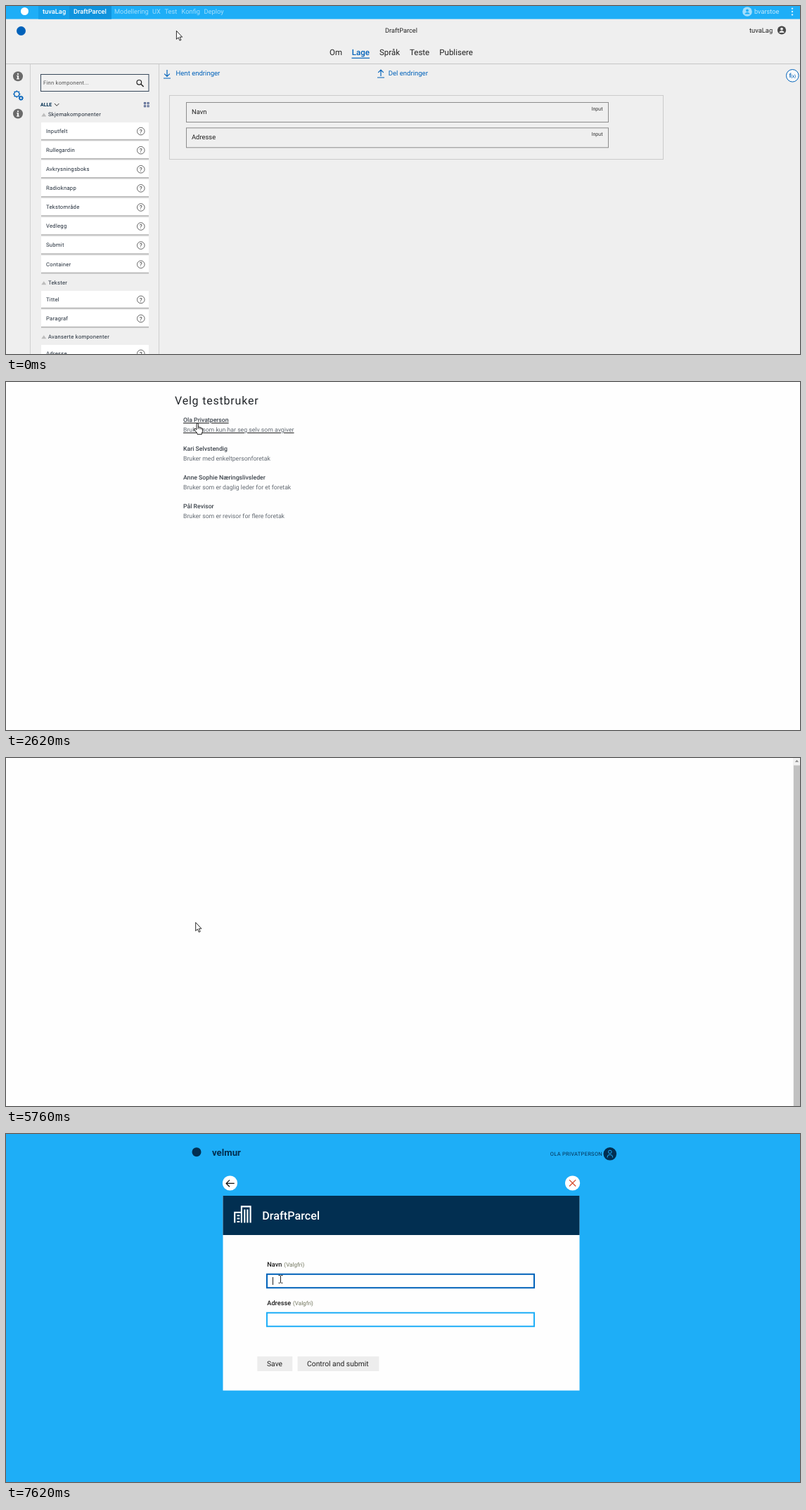
Recreate the animation shown at these times as an HTML page. Size 1129 px wide and 496 px high, loop 8000 ms.

```html
<!DOCTYPE html>
<html lang="nb">
<head>
<meta charset="utf-8">
<title>Testflyt</title>
<style>
html, body { margin: 0; width: 100%; height: 100%; overflow: hidden; background: #fefefe; }
svg { display: block; width: 100vw; height: 100vh; }
text { font-family: Roboto, Arial, sans-serif; white-space: pre; text-rendering: geometricPrecision; }
</style>
</head>
<body>
<svg id="stage" viewBox="0 0 1129 496" xmlns="http://www.w3.org/2000/svg"></svg>
<script>
const LOOP = 8000;
const SKY = '#1eaef7', NAVY = '#022f51', BLUE = '#0062ba', LINK = '#007bff', INK = '#212529';
const ORG = 'tuvaLag', APP = 'DraftParcel', USER = 'bvarstoe', BRAND = 'velmur';

const text = (x, y, s, size, fill = INK, more = '') =>
  `<text x="${x}" y="${y}" font-size="${size}" fill="${fill}" ${more}>${s}</text>`;
const rect = (x, y, w, h, fill, more = '') =>
  `<rect x="${x}" y="${y}" width="${w}" height="${h}" fill="${fill}" ${more}/>`;
const frame = (x, y, w, h, stroke, fill = 'none', sw = 1) =>
  rect(x + sw / 2, y + sw / 2, w - sw, h - sw, fill, `stroke="${stroke}" stroke-width="${sw}"`);
const disc = (x, y, r, fill, more = '') => `<circle cx="${x}" cy="${y}" r="${r}" fill="${fill}" ${more}/>`;
const line = (d, stroke, sw = 1, more = '') =>
  `<path d="${d}" fill="none" stroke="${stroke}" stroke-width="${sw}" ${more}/>`;
const shape = (d, fill, more = '') => `<path d="${d}" fill="${fill}" ${more}/>`;
const group = (id, body, more = '') => `<g id="${id}" ${more}>${body}</g>`;
const MED = 'font-weight="500"', BOLD = 'font-weight="700"', MID = 'text-anchor="middle"';

function gear(x, y, r) {
  let teeth = '';
  for (let i = 0; i < 8; i++) {
    const a = i * Math.PI / 4, c = Math.cos(a), s = Math.sin(a);
    teeth += `M${x + c * r} ${y + s * r}L${x + c * (r + 1.5)} ${y + s * (r + 1.5)}`;
  }
  return disc(x, y, r, 'none', `stroke="${BLUE}" stroke-width="1.3"`) + line(teeth, BLUE, 1.5);
}

const infoIcon = y => disc(17, y, 7, '#6a6a6a') +
  rect(15.9, y - 1.3, 2.2, 5.2, '#efefef') + rect(15, y + 2.9, 4, 1.2, '#efefef') +
  rect(15.2, y - 1.3, 2, 1.1, '#efefef') + disc(17, y - 3.4, 1.2, '#efefef');

const card = (label, y) =>
  rect(50, y - 10.5, 153, 24.3, '#c4c4c4') + rect(50, y - 11, 153, 23.8, '#a9a9a9', 'opacity=".6"') +
  rect(50, y - 12, 153, 23.8, '#fff') +
  text(57, y + 2.7, label, 7.7, '#1f2a37', 'letter-spacing=".25"') +
  disc(191.8, y + .5, 5.3, 'none', 'stroke="#555" stroke-width=".9"') +
  text(191.8, y + 3.5, '?', 8.4, '#333', MID);

const section = (label, y) => shape(`M50.3 ${y + 2.8}L53.8 ${y - 2.2}L57.3 ${y + 2.8}Z`, '#bdbdbd') +
  text(60, y + 2.7, label, 7.7, '#1f2a37', 'letter-spacing=".25"');

const person = (x, y, k, fill) => disc(x, y - 1.6 * k, 1.9 * k, fill) +
  shape(`M${x - 3.6 * k} ${y + 3.6 * k}Q${x - 3 * k} ${y + k} ${x} ${y + k}T${x + 3.6 * k} ${y + 3.6 * k}Z`, fill);

function studio() {
  const nav = [[154, 'Modellering'], [208, 'UX'], [225.5, 'Test'], [249.5, 'Konfig'], [281.5, 'Deploy']];
  const tabs = [[460, 'Om'], [491.7, 'Lage'], [531, 'Språk'], [574, 'Teste'], [616.3, 'Publisere']];
  const parts = ['Inputfelt', 'Rullegardin', 'Avkrysningsboks', 'Radioknapp', 'Tekstområde', 'Vedlegg', 'Submit', 'Container'];
  const field = (label, y) => frame(256, y, 601, 29, '#8c8c8c') +
    text(264, y + 17, label, 9.4, '#222') + text(832.5, y + 12, 'Input', 7.1, '#333');
  return rect(0, 0, 1129, 496, '#efefef') +
    rect(0, 0, 1129, 18.6, SKY) + rect(46, 0, 44, 18.6, '#139fea') + rect(90, 0, 60, 18.6, '#0f93dd') +
    disc(26.5, 7.5, 5.5, '#fff') +
    text(52, 11, ORG, 9.3, '#fff', MED) + text(96, 11, APP, 9.3, '#fff', MED) +
    nav.map(([x, s]) => text(x, 11, s, 9.3, '#a3defc')).join('') +
    disc(1054, 8, 6.8, '#a3defc') + person(1054, 8, 1, SKY) + text(1064, 11, USER, 9.2, '#c3e9fd') +
    [3.6, 8, 12.4].map(y => disc(1118, y, 1.2, '#d4f0fe')).join('') +
    disc(21.5, 35.5, 6.5, BLUE) +
    text(562, 38, APP, 9.2, '#222', MID) + text(1057, 38, ORG, 9.4, '#222') +
    disc(1103, 34.5, 6.1, '#4b4b4b') + person(1103, 34.3, 1, '#efefef') +
    tabs.map(([x, s]) => text(x, 70.3, s, 11.5, s === 'Lage' ? BLUE : '#222', s === 'Lage' ? MED : '')).join('') +
    rect(491.5, 73.6, 25.5, 1.2, BLUE) +
    rect(0, 82, 1129, 1, '#c6c6c6') + rect(34, 83, 1, 413, '#cfcfcf') + rect(217, 83, 1, 413, '#cfcfcf') +
    infoIcon(100.3) + gear(15.3, 125.5, 3.6) + gear(21.3, 131.3, 2) + infoIcon(153.5) +
    frame(49, 97, 154.5, 25, '#37485a', '#f1f1f1') +
    text(53, 111.5, 'Finn komponent...', 7.6, '#555', 'letter-spacing=".25"') +
    disc(189.3, 108.8, 3.3, 'none', 'stroke="#222" stroke-width="1.2"') + line('M191.8 111.3L195.6 115', '#222', 1.5) +
    text(49, 143, 'ALLE', 7, NAVY, BOLD) + line('M69 139L72.2 142.3 75.4 139', '#333', 1) +
    [[196, 137], [200.6, 137], [196, 141.2], [200.6, 141.2]].map(([x, y]) => frame(x, y, 3, 3, '#3b4f80', 'none', .9)).join('') +
    section('Skjemakomponenter', 154.6) + parts.map((s, i) => card(s, 178 + 27.12 * i)).join('') +
    section('Tekster', 394.4) + card('Tittel', 418) + card('Paragraf', 445) +
    section('Avanserte komponenter', 471.4) + card('Adresse', 495) +
    line('M229 91V100M225.2 96.6L229 100.4 232.8 96.6M224 103H234', BLUE, 1.2) +
    text(241.5, 99, 'Hent endringer', 9.55, BLUE) +
    line('M533 100V91M529.2 94.8L533 91 536.8 94.8M528 102H538', BLUE, 1.2) +
    text(543.7, 99, 'Del endringer', 9.55, BLUE) +
    disc(1118.3, 99.3, 8.8, '#fafafa', `stroke="${BLUE}" stroke-width="1"`) +
    text(1113.5, 102, 'f', 8.5, BLUE, MED) + text(1116, 102, '(x)', 6, BLUE, MED) +
    frame(232, 127, 703, 92, '#cbcbcb') + field('Navn', 137) + field('Adresse', 173.3) +
    group('menu', rect(222, 4, 24, 10, SKY) + text(225.5, 11, 'Test', 9.3, '#fff') +
      frame(222, 18, 85, 73, '#c8c8c8', '#fff') + rect(223, 22, 83, 20, '#e9ecef', 'id="row"') +
      ['Manuell', 'Automatisk', 'Resultat'].map((s, i) => text(230, 35 + 20 * i, s, 8.7)).join(''));
}

function users() {
  const list = [
    ['Ola Privatperson', 'Bruker som kun har seg selv som avgiver'],
    ['Kari Selvstendig', 'Bruker med enkeltpersonforetak'],
    ['Anne Sophie Næringslivsleder', 'Bruker som er daglig leder for et foretak'],
    ['Pål Revisor', 'Bruker som er revisor for flere foretak']];
  return text(240, 32, 'Velg testbruker', 16, INK, 'letter-spacing=".8"') +
    list.map(([a, b], i) => `<g id="user${i}">` + text(252, 57.2 + 40.8 * i, a, 8.7, '#3d444c', MED) +
      text(252, 71.2 + 40.8 * i, b, 8.7, '#636a72') + '</g>').join('');
}

function instance() {
  const button = (y, w, s, id = '') => rect(240, y, w, 21.7, LINK, id) + text(247.8, y + 14, s, 8.7, '#fff', MED);
  const rows = [['1883', '2/1/19 9:58:28 AM'], ['1910', '2/1/19 10:00:30 AM'], ['1110', '2/1/19 10:04:54 AM']];
  const top = i => 300.5 + 27.6 * i;
  return rect(240, 16.5, 644, 28.5, '#fdf1cd') + text(252.5, 34, 'Det finnes tekniske advarsler', 8.75, LINK) +
    text(240, 64.6, 'Velg språk for instans', 8.73) + frame(240, 73, 644, 22, '#ced4da', '#fff') +
    text(249.5, 87.6, 'English', 8.7, '#495057') + shape('M875.2 82H880.6L877.9 87.3Z', '#222') +
    button(104.4, 74, 'Oppdater språk') +
    text(240, 145.8, 'Preutfylling', 8.73) + frame(240, 153, 644, 58, '#ced4da', '#fff') +
    rect(872, 154, 12, 56, '#f1f1f1') +
    shape('M875.5 162.3L878 159 880.5 162.3ZM875.5 203L878 206.3 880.5 203Z', '#8a8a8a') +
    rect(239.2, 219.8, 47.4, 23.4, '#8fc1f8', 'id="ring"') + button(220.6, 45.4, 'Start ny', 'id="start"') +
    text(240, 265.4, 'Meldingsboks', 13.1) +
    rows.map((r, i) => rect(240, top(i), 644, 27.6, i % 2 ? '#fefefe' : '#f1f1f1')).join('') +
    frame(240, 272.5, 644, 111, '#dee2e6') + rect(413, 273, 1, 110, '#dee2e6') +
    rows.map((r, i) => rect(240, Math.floor(top(i)), 644, 1, '#dee2e6') +
      text(247.8, top(i) + 17, r[0], 8.7, LINK) + text(420.5, top(i) + 17, r[1], 8.7)).join('') +
    text(247.8, 290, 'Id', 8.7, INK, BOLD) + text(420.5, 290, 'Sist endret', 8.7, INK, BOLD) +
    button(393.2, 104.8, 'Tilbake til Velmur Studio');
}

function form() {
  const field = (label, y, dx, id) => text(371.3, y - 9.5, label, 9.2, '#1a1a1a', MED) +
    text(dx, y - 9.7, '(Valgfri)', 8.05, '#70745c') +
    rect(371, y + 1, 380, 19.4, '#fff', `id="${id}" stroke="${SKY}" stroke-width="2"`);
  return rect(0, 0, 1129, 496, SKY) +
    disc(271, 25.7, 6.5, NAVY) + text(293, 31.3, BRAND, 13.2, NAVY, BOLD) +
    disc(858.8, 28.3, 9.3, NAVY) + disc(858.8, 25.5, 2.3, 'none', `stroke="${SKY}" stroke-width="1"`) +
    line('M855.2 33.5V32Q855.2 29.5 858.8 29.5T862.4 32V33.5', SKY, 1) +
    disc(318.5, 70, 10.6, '#fff') + line('M324.7 70.4H313.4M318 65.6L313.2 70.4 318 75.2', '#111', 1.3) +
    disc(805.6, 70, 10.6, '#fff') + line('M801 65.3L810.2 74.5M810.2 65.3L801 74.5', '#d4492a', 1.2) +
    rect(308.5, 88, 507, 167.4, '#fefefe', 'id="sheet"') + rect(308.5, 88, 507, 56, NAVY) +
    line('M325.2 126.5V111.8H334.5M334.9 126.5V103.4H347.6V126.5M339.3 126.5V107.5M343.4 126.5V107.5', '#fff', 2.1) +
    line('M328.5 116.2H332.3M328.5 120.6H332.3M328.5 125H332.3', '#fff', 2) +
    group('wait', rect(357.3, 207, 48, 21, '#ededed') + rect(412.3, 207, 108.8, 21, '#ededed')) +
    group('ready', text(848, 31.3, 'OLA PRIVATPERSON', 7.5, NAVY, 'letter-spacing=".3" text-anchor="end"') +
      text(364.3, 122, APP, 16.2, '#fff', MED) +
      field('Navn', 198.8, 395.3, 'name') + field('Adresse', 253.8, 408, 'street') +
      rect(357.3, 317, 50, 21, '#ededed') + rect(414.6, 317, 115.8, 21, '#ededed') +
      text(371, 331, 'Save', 10.3, '#222') + text(428, 331, 'Control and submit', 10.35, '#222') +
      rect(379, 204, 1, 11, '#222', 'id="caret"'));
}

const bar = rect(1119, 0, 10, 496, '#f1f1f1') + rect(1120, 10.5, 9, 486, '#c1c1c1') + shape('M1121.8 5.8L1124.5 2.8 1127.2 5.8Z', '#8a8a8a');

const cursors = group('arrow', shape('M.4 .4V12.4L3.1 9.9 5 14.2 6.9 13.4 5 9.2H8.6Z', '#fff', 'stroke="#111" stroke-width=".9"')) +
  group('hand', shape('M4 2C4 .2 6.3 .2 6.4 2V6.2Q8.4 5.6 8.8 7Q10.6 6.4 11 7.8Q12.6 7.6 12.6 9.2V12.2L11.4 15V16.6H5V15.2L.8 10Q.2 8 2 8.2L4 10Z', '#fff', 'stroke="#111" stroke-width=".9" stroke-linejoin="round"') +
    line('M6.4 6V9M8.8 7V9.4M11 8V9.8', '#111', .8)) +
  group('beam', line('M.5 .5H2.6L3.5 1.2 4.4 .5H6.5M3.5 1V10.8M.5 11.3H2.6L3.5 10.6 4.4 11.3H6.5', '#222', 1));

const stage = document.getElementById('stage');
stage.innerHTML = rect(0, 0, 1129, 496, '#fefefe') + group('studio', studio()) + group('users', users()) +
  group('instance', instance()) + group('bar', bar) + group('form', form()) + cursors;
const el = id => stage.querySelector('#' + id);
const show = (id, on) => el(id).setAttribute('visibility', on ? 'inherit' : 'hidden');
const set = (id, key, value) => el(id).setAttribute(key, value);

// pointer stops: start time, kind, left, top
const stops = [
  [0, 'arrow', 242, 35], [160, 'hand', 230, 4], [470, 'hand', 243, 24], [630, 'hand', 243, 44],
  [780, 'hand', 243, 46], [2310, 'arrow', 250, 48], [2460, 'hand', 265.5, 58], [2620, 'hand', 267, 58],
  [4650, 'beam', 274, 161], [4800, 'beam', 278, 211], [4950, 'hand', 268, 234], [5100, 'hand', 266, 234],
  [5450, 'arrow', 269.3, 234], [7160, 'arrow', 345, 209], [7310, 'beam', 372, 204], [7460, 'beam', 387, 201]];

function draw(t) {
  const within = (a, b) => t >= a && t < b;
  show('studio', t < 1390);
  show('menu', within(160, 1390));
  show('row', within(470, 1390));
  set('row', 'y', t < 630 ? 22 : 42);

  show('users', within(1390, 3730));
  set('user0', 'text-decoration', t >= 2460 ? 'underline' : 'none');

  show('instance', within(3730, 5450));
  show('ring', within(5260, 5450));
  set('start', 'fill', t >= 5260 ? '#0062cc' : t >= 4950 ? '#0069d9' : LINK);

  show('bar', within(5760, 6530));
  show('form', t >= 6530);
  show('wait', within(6530, 6690));
  show('ready', t >= 6690);
  set('sheet', 'height', t < 6690 ? 167.4 : 277.6);
  set('name', 'stroke', t < 7620 ? SKY : BLUE);
  show('caret', t >= 7620);

  const [, kind, x, y] = stops.filter(s => s[0] <= t).pop();
  for (const id of ['arrow', 'hand', 'beam']) show(id, id === kind);
  set(kind, 'transform', `translate(${x} ${y})`);
}

function tick() {
  draw(performance.now() % LOOP);
  requestAnimationFrame(tick);
}
tick();
</script>
</body>
</html>
```
